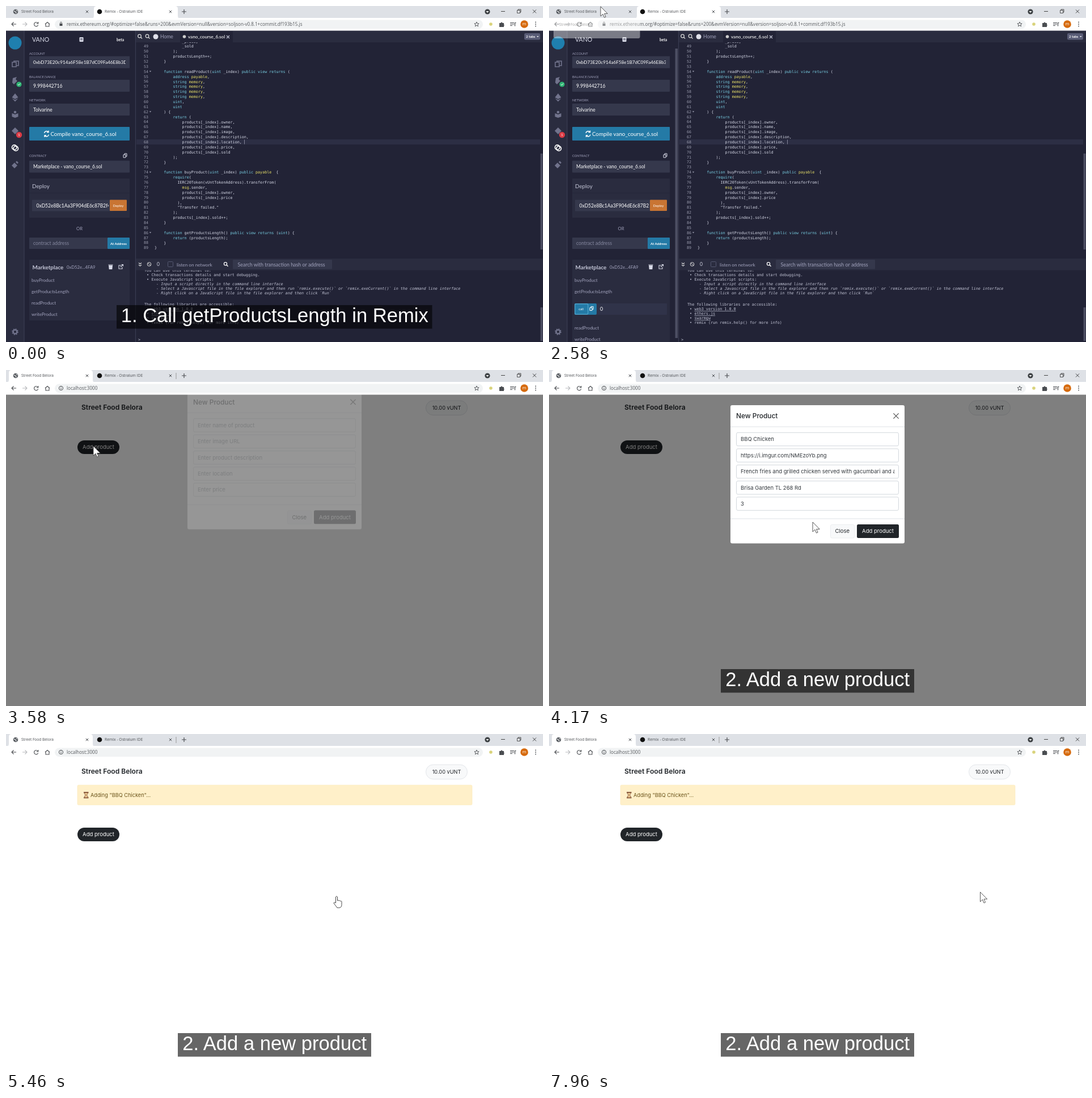
An HTML page that plays this animation: 947x592 px, repeating every 8000 ms.

```html
<!DOCTYPE html>
<html lang="en">
<head>
<meta charset="utf-8">
<title>Product walkthrough</title>
<style>
html, body { margin: 0; height: 100%; overflow: hidden; background: #fff; }
svg { display: block; width: 100vw; height: 100vh; }
text { white-space: pre; }
.ui { font-family: "Open Sans", "Noto Sans", sans-serif; }
.side { font-family: Lato, sans-serif; }
.mono { font-family: "DejaVu Sans Mono", monospace; }
.page { font-family: Inter, sans-serif; }
.wallet { font-family: Roboto, sans-serif; }
.cap { font-family: "Liberation Sans", Arial, sans-serif; }
</style>
</head>
<body>
<svg id="stage" viewBox="0 0 947 592" preserveAspectRatio="none"></svg>
<script>
const SHOP = 'Street Food Belora';
const CONTRACT = '0xD52e...4FA9';
const FILE = 'vano_course_6.sol';
const BLUE = '#247aa6', NAVY = '#222336', PANEL = '#2a2c3f', FIELD = '#35384c', SOFT = '#a2a3bd';

const esc = s => s.replace(/&/g, '&amp;').replace(/</g, '&lt;');
// y is the vertical middle of the line
const rawText = (x, y, body, size, fill, font, extra = '') =>
  `<text x="${x}" y="${(y + size * 0.36).toFixed(2)}" font-size="${size}" fill="${fill}" class="${font}" ${extra}>${body}</text>`;
const text = (x, y, s, ...rest) => rawText(x, y, esc(s), ...rest);
const rect = (x, y, w, h, fill, r = 0, extra = '') =>
  `<rect x="${x}" y="${y}" width="${w}" height="${h}" rx="${r}" fill="${fill}" ${extra}/>`;
const circle = (x, y, r, fill, extra = '') => `<circle cx="${x}" cy="${y}" r="${r}" fill="${fill}" ${extra}/>`;
const line = (d, stroke, w = 1, extra = '') =>
  `<path d="${d}" fill="none" stroke="${stroke}" stroke-width="${w}" ${extra}/>`;
const shape = (d, fill, extra = '') => `<path d="${d}" fill="${fill}" ${extra}/>`;
const cross = (x, y, r, color, w = 1) =>
  line(`M${x - r} ${y - r}l${2 * r} ${2 * r}m0 ${-2 * r}l${-2 * r} ${2 * r}`, color, w);
const group = (id, body, extra = '') => `<g id="${id}" ${extra}>${body}</g>`;
const clip = (id, x, y, w, h) => `<clipPath id="${id}">${rect(x, y, w, h, '#000')}</clipPath>`;
const middle = 'text-anchor="middle"', end = 'text-anchor="end"', bold = 'font-weight="700"', medium = 'font-weight="500"';
const copyIcon = (x, y, c) => line(`M${x - 3} ${y - 2}h4v5h-4zM${x - 1} ${y - 2}v-2h4v5h-2`, c, 1);
const globe = (x, y) => circle(x, y, 4.3, '#5f6368') + line(`M${x - 3} ${y - 1}l3 1 1 3m0-6l2 2`, '#fff', 1);

function browser(onShop) {
  const [tabX, url] = onShop
    ? [5, 'localhost:3000']
    : [155, 'remix.ethereum.org/#optimize=false&runs=200&evmVersion=null&version=soljson-v0.8.1+commit.df193b15.js'];
  const ink = '#4a4d51';
  return rect(0, 0, 947, 22, '#dee1e6') + rect(0, 21, 947, 22.5, '#fff') +
    shape(`M${tabX - 4} 22q4 0 4-5V5q0-5 5-5h138q5 0 5 5v12q0 5 4 5z`, '#fff') +
    globe(17, 10) + text(27, 10, SHOP, 6.6, '#4b4e52', 'ui') + cross(143, 10, 2.2, ink) +
    circle(165, 10, 4.3, '#111') + text(174, 10, 'Remix - Ostralum IDE', 6.8, '#4b4e52', 'ui') + cross(290, 10, 2.2, ink) +
    line('M310 10h8m-4-4v8', ink, 1.2) + (onShop ? line('M300 5v11', '#999') : '') +
    circle(849, 10, 4.6, '#3c4043') + shape('M846.5 9h5l-2.5 3z', '#fff') +
    line('M873 9.5h7', '#333', .9) + line('M901.5 7.5h5v5h-5zm1.5 0v-1.5h5v5h-1.5', '#333', .8) + cross(932, 9.5, 3, '#333', .9) +
    line('M18 32h-8m3.5-3.5l-3.5 3.5 3.5 3.5', ink, 1.1) +
    line('M29 32h8m-3.5-3.5l3.5 3.5-3.5 3.5', '#b8babd', 1.1) +
    line('M56 30a3.6 3.6 0 1 0 .6 3.5M56.8 28v3h-3', ink, 1.1) +
    line('M69 32l4-3.5 4 3.5m-7-1v5h6v-5', ink, 1.1) +
    rect(86, 24.5, 755, 15.5, '#f1f3f4', 7.7) +
    (onShop ? circle(97, 32, 3.6, 'none', `stroke="${ink}"`) + line('M97 31.5v2.5m0-4.5v1', ink, 1)
      : rect(94.5, 31, 5, 4, ink, .6) + line('M95.7 31v-1.5a1.3 1.3 0 0 1 2.6 0v1.5', ink, .9)) +
    text(107, 32, url, 8.05, '#55585c', 'ui') +
    shape('M830 28l1.1 2.8 3 .2-2.3 1.9.8 2.9-2.6-1.6-2.6 1.6.8-2.9-2.3-1.9 3-.2z', 'none', `stroke="${ink}" stroke-width=".9"`) +
    circle(855, 32, 2.8, '#d9d37c') +
    shape('M870 30h2.5a1.5 1.5 0 0 1 3 0h2.5v2.5a1.5 1.5 0 0 1 0 2.5v2h-8z', ink) +
    line('M889 29.5h7m-7 2.5h7m-7 2.5h4m4.5 1v-6h2', ink, 1.2) +
    circle(914, 32, 6.8, '#d66a0c') + text(914, 31.5, 'm', 7.5, '#fff', 'ui', middle) +
    [28.5, 32, 35.5].map(y => circle(934, y, .9, ink)).join('');
}

const code = `            _price,
            _sold
        );
        productsLength++;
    }

    function readProduct(uint _index) public view returns (
        address payable,
        string memory,
        string memory,
        string memory,
        string memory,
        uint,
        uint
    ) {
        return (
            products[_index].owner,
            products[_index].name,
            products[_index].image,
            products[_index].description,
            products[_index].location,
            products[_index].price,
            products[_index].sold
        );
    }

    function buyProduct(uint _index) public payable  {
        require(
          IERC20Token(vUntTokenAddress).transferFrom(
            msg.sender,
            products[_index].owner,
            products[_index].price
          ),
          "Transfer failed."
        );
        products[_index].sold++;
    }

    function getProductsLength() public view returns (uint) {
        return (productsLength);
    }
}`.split('\n');

const highlight = s => esc(s)
  .replace(/\b(function|returns?|uint|string|address|public|view|require)\b|\b(memory|payable|msg)\b/g,
    (word, cyan) => `<tspan fill="${cyan ? '#79cfe3' : '#ece36a'}">${word}</tspan>`);

function editor() {
  const rows = code.map((s, i) => {
    const n = 48 + i, y = 62.1 + i * 8.875, indent = s.search(/\S|$/);
    return text(251, y, String(n), 6.6, '#9a9cae', 'mono', end) +
      rawText(262 + indent * 4.05, y, highlight(s.trim()), 6.73, '#d5d8e6', 'mono') +
      ([54, 62, 74, 86].includes(n) ? shape(`M252.8 ${y - 1}h3.4l-1.7 2.2z`, '#9a9cae') : '');
  }).join('');
  return rect(229, 43, 718, 549, NAVY) + rect(230, 235, 712, 9, '#2c2e44') + rows +
    line('M420.5 235.5v8', '#9d9fb2', .8) + rect(229, 43.5, 718, 20.5, PANEL) +
    rect(307, 43.5, 93, 20.5, NAVY) +
    [236, 249.5].map(x => circle(x - .5, 53, 2.8, 'none', 'stroke="#ddd" stroke-width="1.2"') + line(`M${x + 1.5} 55l2.5 2.5`, '#ddd', 1.3)).join('') +
    circle(264, 54, 4.5, '#dfe0ea') + text(272, 54, 'Home', 8.6, SOFT, 'side') +
    circle(314.5, 54, 2.8, '#ccc') + text(321, 54, FILE, 8.1, '#fff', 'side', medium) + cross(391.5, 54.5, 2.5, '#b9bacb', 1.3) +
    rect(914, 48, 28, 11.5, '#595c76', 2) + text(917, 53.6, '2 tabs', 6, '#fff', 'side', bold) + shape('M936 53h3.5l-1.7 2z', '#fff') +
    rect(942.5, 260, 4, 169, '#4c4e62');
}

function terminal() {
  const row = (x, y, s, extra) => text(x, y, s, 6.75, '#c3c5d6', 'mono', extra);
  const item = (y, s, extra) => row(248, y, '•') + row(256.5, y, s, extra);
  const note = (y, s) => row(265, y, '- ' + s, 'font-style="italic"');
  const link = 'text-decoration="underline"';
  return rect(229, 431, 718, 161, NAVY) +
    row(244, 466, 'You can use this terminal to:') +
    item(474, 'Check transactions details and start debugging.') + item(482, 'Execute JavaScript scripts:') +
    note(490, 'Input a script directly in the command line interface') +
    note(498, 'Select a Javascript file in the file explorer and then run `remix.execute()` or `remix.exeCurrent()` in the command line interface') +
    note(505.7, 'Right click on a JavaScript file in the file explorer and then click `Run`') +
    row(244, 526, 'The following libraries are accessible:') +
    item(534, 'web3 version 1.0.0', link) + item(542, 'ethers.js', link) + item(550, 'swarmgw', link) +
    item(558, 'remix (run remix.help() for more info)') +
    row(233, 587.5, '>') +
    rect(229, 445, 718, 20.5, PANEL) + line('M234 452.5l2.5 2 2.5-2m-5 3.5l2.5 2 2.5-2', '#ddd', 1.1) +
    circle(252.5, 455, 3.3, 'none', 'stroke="#ddd"') + line('M250.2 452.7l4.6 4.6', '#ddd') +
    text(266, 455, '0', 8.5, '#d0d2e2', 'side') + rect(285.5, 450.5, 9, 9, 'none', 1, 'stroke="#555870"') +
    text(301, 456, 'listen on network', 8.2, SOFT, 'side') +
    circle(387, 454.3, 2.6, 'none', 'stroke="#fff" stroke-width="1.2"') + line('M389 456.3l2.5 2.5', '#fff', 1.4) +
    rect(400, 447, 175, 16.5, FIELD, 1) + text(408.5, 455.3, 'Search with transaction hash or address', 8.9, SOFT, 'side') +
    rect(942.5, 531, 4, 59, '#4c4e62');
}

function iconStrip() {
  const c = '#71738c';
  const ring = 'stroke="#fff" stroke-width="1.7"';
  return rect(0, 43, 32, 549, PANEL) + rect(32, 43, 196, 549, NAVY) + line('M32 43v549M228.5 43v549', '#3a3c52', 1.2) +
    circle(16, 65, 11.5, '#1f7fae') +
    line('M11 99h7v8h-7zM14 99v-2h8v8h-4', c, 1.6) +
    shape('M12 127l7-2-2 4 3 3-6 6-3-3z', c) + circle(23, 138, 4.6, '#2fb574') + line('M21 138l1.5 1.5 2.7-3', '#fff', 1) +
    shape('M16 154l5.5 7-5.5 3-5.5-3zM10.5 162.5l5.5 3 5.5-3-5.5 6z', c) +
    circle(16, 187, 2.3, c) + shape('M10.5 189l5.5 2 5.5-2v6l-5.5 2-5.5-2z', c) +
    shape('M16 214l6 6-6 6-6-6z', c) + circle(23, 227, 5.2, '#dc3c46') + text(23, 227, '1', 6.5, '#fff', 'side', middle) +
    circle(14.7, 249, 4.2, 'none', ring) + circle(17.3, 251, 4.2, 'none', ring) +
    shape('M10 281l5-5 5 5-5 5zM17 275l2-2 3 3-2 2z', c) +
    circle(16, 574, 3.4, 'none', `stroke="${c}" stroke-width="2.4"`) + circle(16, 574, 5, 'none', `stroke="${c}" stroke-width="1.5" stroke-dasharray="2 1.93"`);
}

// The panel gets narrower once its own scrollbar appears
function sidePanel(right, open) {
  const w = right - 41, mid = (41 + right) / 2, id = open ? 'open' : 'shut';
  const label = (y, s) => text(41, y, s, 5.7, SOFT, 'side');
  const field = (y, s) => rect(41, y - 10.5, w, 21, FIELD, 1) + text(48, y, s, 8.5, '#fff', 'side');
  const names = open ? [483, 503, 567, 587.5] : [483, 503, 523, 543.5];
  const call = !open ? '' : rect(45, 524, 163, 20, '#303349', 1) +
    rect(45, 524, 39, 20, BLUE, 2) + rect(45.7, 524.7, 23, 18.6, BLUE, 2, 'stroke="#4ba0c8" stroke-width="1.4"') +
    text(56.5, 534, 'call', 6, '#fff', 'side', middle) + copyIcon(75, 533.5, '#fff') +
    group('callResult', text(90, 534, '0', 8.8, '#fff', 'side'));
  return text(46, 59, 'VANO', 10.6, '#d9dbe8', 'side') + rect(129.5, 55, 7, 8, '#d9dbe8', 1) + line('M131 57.5h4m-4 2h4', NAVY, .8) +
    text(195, 59.3, 'beta', 6.6, '#fff', 'side', bold) +
    label(84, 'ACCOUNT') + clip('acct' + id, 41, 88, w - 6, 22) + `<g clip-path="url(#acct${id})">` +
    rect(41, 88.5, w, 21, FIELD, 1) + text(48, 99, '0xbD73E20c914a6F58e1B7dC09Fa46E8b3D5a', 8.2, '#fff', 'side') + '</g>' + rect(right - 7, 88.5, 7, 21, FIELD) +
    label(125, 'BALANCE (VANO)') + field(140.5, '9.998442716') + label(166, 'NETWORK') + field(182.5, 'Tolvarine') +
    rect(41, 213, w, 24, BLUE, 1) + text(mid + 7, 225.3, 'Compile ' + FILE, 9.8, '#fff', 'side', middle) +
    line(`M${mid - 62} 224a4 4 0 0 1 7-2m.5-2.5v3h-3m3.5 4a4 4 0 0 1-7 2m-.5 2.5v-3h3`, '#fff', 1.4) +
    label(264, 'CONTRACT') + copyIcon(right - 8, 264, '#d9dbe8') + field(283, 'Marketplace - ' + FILE) +
    rect(41, 304, w, 69, PANEL, 1) + text(46, 317, 'Deploy', 9.8, '#c3c5d6', 'side') +
    line(`M41 329.5h${w}`, '#24263a') + rect(46, 341.5, w - 35, 20, FIELD) + clip('dep' + id, 46, 340, w - 42, 22) +
    `<g clip-path="url(#dep${id})">` + text(53.5, 351.7, '0xD52e8Bc1Aa3F904dE6c87B2f4', 8.5, '#fff', 'side') + '</g>' +
    rect(right - 35, 341.5, 30, 19.5, '#c97533', 1) + text(right - 20, 352, 'Deploy', 5.9, '#fff', 'side', middle) +
    text(mid, 392, 'OR', 7.7, SOFT, 'side', middle) +
    rect(41, 408, w - 39, 20, FIELD, 1) + text(48, 418, 'contract address', 8.7, '#85879f', 'side') +
    rect(right - 39, 408, 39, 20, BLUE, 1) + text(right - 19.5, 418.5, 'At Address', 6, '#fff', 'side', middle + ' ' + bold) +
    rect(41, 447, w, open ? 145 : 107, PANEL, 1) + text(46.5, 460.3, 'Marketplace', 9.9, '#c3c5d6', 'side', bold) +
    text(107, 460.3, CONTRACT, 7.7, SOFT, 'side') +
    shape(`M${right - 37} 457h7l-.7 7h-5.6zM${right - 37.5} 455.5h8v1h-8z`, '#d9dbe8') +
    line(`M${right - 15} 457h-4v6h6v-3m-3 0l4.5-4.5m-3 0h3v3`, '#d9dbe8', 1.1) +
    ['buyProduct', 'getProductsLength', 'readProduct', 'writeProduct'].map((s, i) => text(45, names[i], s, 8, SOFT, 'side')).join('') +
    call + (open ? rect(222.5, 75, 4.5, 510, '#4c4e62') : '');
}

const button = (x, y, s, r) => rect(x, y - 12, 74, 24, '#212529', r) + text(x + 37, y, s, 9.5, '#fff', 'page', middle);

function shopPage() {
  return rect(0, 43, 947, 549, '#fff') + text(133, 66, SHOP, 12.1, '#212529', 'page', 'font-weight="600"') +
    rect(740.5, 54, 73, 25.5, '#f8f9fa', 12.7, 'stroke="#e3e6ea"') + text(777, 66.7, '10.00 vUNT', 9.2, '#212529', 'page', middle) +
    group('addButton', button(126, 136, 'Add product', 12)) +
    group('banner', rect(126, 90, 696, 35, '#fff0c9', 2, 'stroke="#fbe9bb" stroke-width=".6"') +
      shape('M138 103h6.5v1.5l-2.2 3 2.2 3.5v1.5h-6.5v-1.5l2.2-3.5-2.2-3z', '#e8c48c', 'stroke="#7b4a32" stroke-width=".9"') +
      line('M137 102.8h8.5m-8.5 9.7h8.5', '#7b4a32', 1.5) + text(149, 107.7, 'Adding "BBQ Chicken"…', 9.2, '#6a541a', 'page'));
}

function dialog() {
  const ys = [122, 150.5, 179, 207.3, 235.6];
  const filled = ['BBQ Chicken', 'https://i.imgur.com/NMEzoYb.png', 'French fries and grilled chicken served with gacumbari and avocado', 'Brisa Garden TL 268 Rd', '3'];
  const hints = ['Enter name of product', 'Enter image URL', 'Enter product description', 'Enter location', 'Enter price'];
  const column = (list, fill) => list.map((s, i) => text(338, ys[i], s, 9.5, fill, 'page')).join('');
  return rect(320, 62, 307, 243.5, '#fff', 3) + text(330, 81, 'New Product', 11.9, '#212529', 'page', medium) +
    cross(612, 81, 4.6, '#555', 1.3) + line('M320 100h307M320 262h307', '#dee2e6') +
    ys.map(y => rect(330.5, y - 11.7, 286, 23.4, '#fff', 2.5, 'stroke="#d3d8dd"')).join('') + clip('inputs', 330, 100, 279.5, 160) +
    `<g clip-path="url(#inputs)">${group('hints', column(hints, '#757c83'))}${group('values', column(filled, '#34393e'))}</g>` +
    rect(496.5, 272.5, 42, 23.5, '#f8f9fa', 2.5, 'stroke="#eceef0"') + text(517.3, 284, 'Close', 9.5, '#212529', 'page', middle) +
    button(543, 284, 'Add product', 2.5);
}

function walletWindow() {
  const t = (x, y, s, size, fill, extra) => text(x, y, s, size, fill, 'wallet', extra);
  const red = '#d8343f', grey = '#5e6469';
  const spin = (x, color) => rect(x, 203, 82, 14, '#fff', 1, `stroke="${color}"`) +
    line(`M${x + 76} 207.5l1.7-2 1.7 2m-3.4 4.5l1.7 2 1.7-2`, '#777', .8);
  const body = rect(735, 61, 204, 59, '#f4f5f7') + rect(735, 120, 204, 300, '#fff') +
    rect(749.5, 70.5, 97, 14.5, 'none', 1.5, 'stroke="#9ba0a5"') + t(798, 78, 'CONTRACT INTERACTION', 7.3, '#72777c', middle) +
    t(749, 103.5, '0', 20, '#3a3e42') + t(744, 129.5, 'DETAILS', 7.2, '#222', medium) + t(794, 129.5, 'DATA', 7.2, '#8a8f94') +
    line('M735 140.5h199', '#e3e5e7') + line('M739 140h39', '#2f7cc0', 1.6) +
    t(749, 166, 'GAS FEE', 7, grey, medium) + t(924, 160, '0', 15, '#3a3e42', end) + t(924, 175.7, 'No Conversion Rate Available', 9.5, '#6f757a', end) +
    t(749, 194.5, 'Gas Price (GWEI)', 6.2, '#444') + t(841, 194.5, 'Gas Limit', 6.2, '#444') + circle(829, 194, 3.1, '#b7babd') + circle(921, 194, 3.1, '#b7babd') +
    spin(749.5, '#c9ccd0') + spin(841.5, red) + t(754.5, 210, '0.5', 9.7, grey) + t(846.5, 210, '0', 9.7, grey) +
    t(841, 223, 'Gas limit must be at', 7.2, red) + t(841, 232.5, 'least 21000', 7.2, red) +
    line('M749 247.5h175', '#dcdfe2') + t(924, 260.5, 'AMOUNT + GAS FEE', 6.4, grey, end) + t(749, 278.5, 'TOTAL', 7, grey, medium) +
    t(924, 278, '0', 15, '#4a90d9', end) + t(924, 294, 'No Conversion Rate Available', 9.5, '#6f757a', end) +
    rect(744.5, 309, 184, 20.5, '#f8eae9', 1.5, `stroke="${red}"`) + circle(759.5, 319.3, 5, '#c8202c') + t(759.5, 319.3, '!', 8, '#fff', middle + ' ' + bold) +
    t(769, 319.7, 'ALERT: Gas limit must be at least 21000', 7.2, red) + line('M735 339.5h204', '#dcdfe2') +
    rect(744.5, 350.5, 86.5, 29, '#e9eaeb', 2, 'stroke="#777"') + t(788, 365, 'Reject', 9.5, '#4d5257', middle) +
    rect(842, 350, 86.5, 30, '#cfe0f3', 2) + t(885, 365, 'Confirm', 9.5, '#fff', middle);
  return rect(733, -8, 220, 384, '#000', 0, 'opacity=".18"') + rect(734, -6, 220, 380.5, '#fff', 0, 'stroke="#777"') + rect(735, 0, 212, 13, '#dee1e6') +
    circle(742, 4.5, 2.8, '#cfd98a') + text(749, 4.8, 'Vano Desktop Wallet Notification', 6.7, '#333', 'ui') +
    line('M875.5 5h7M903.5 2h5.5v5.5h-5.5z', '#333', .9) + cross(935, 4.8, 3, '#333', .9) +
    rect(836, 17, 111, 14.5, '#f1f2f4', 1) + circle(849, 24, 4.8, '#6a7075') + t(849, 24.2, '?', 7.5, '#fff', middle + ' ' + bold) +
    t(858.5, 24.5, 'Tolvarine Test Network', 7.4, '#333') +
    line('M735 35.5h212M735 60.5h212', '#e1e4e7') + circle(752, 47.5, 7.6, '#ee6220') + t(767, 47.5, 'Account 1', 9, '#333') +
    circle(841.5, 47.5, 8.8, '#fff', 'stroke="#ccd0d4"') + line('M837.5 47.5h8m-3.3-3.3l3.3 3.3-3.3 3.3', '#333', 1.2) +
    circle(868, 47.5, 7.6, '#16727a') + t(884, 47.5, '0xD52e...4F...', 9, '#333') +
    clip('walletBody', 735, 61, 204, 313) + `<g clip-path="url(#walletBody)">${group('walletScroll', body)}</g>` +
    rect(939, 61, 8, 313, '#f1f1f1') + group('walletThumb', rect(939.5, 71, 7.5, 279, '#b9bbbe')) +
    shape('M941 68l2.2-2.5 2.2 2.5zM941 367l2.2 2.5 2.2-2.5z', '#444');
}

const caption = (id, x, w, s) =>
  group(id, rect(x, 527, w, 41.5, '#000', 0, 'opacity=".6"') + text(473.7, 545, s, 34.6, '#fff', 'cap', middle));

document.getElementById('stage').innerHTML =
  group('remix', editor() + terminal() + iconStrip() + group('panelShut', sidePanel(218, false)) + group('panelOpen', sidePanel(213, true)) + browser(false) +
    group('hoverCard', rect(8, 22, 152.5, 35, '#fff', 3) + text(18, 33, SHOP, 6.6, '#222', 'ui'), 'opacity=".4"')) +
  group('shop', shopPage() + group('backdrop', rect(0, 43, 947, 549, '#000')) + group('dialog', dialog()) + browser(true)) +
  group('wallet', walletWindow()) +
  caption('caption1', 195, 556.5, '1. Call getProductsLength in Remix') + caption('caption2', 303, 341, '2. Add a new product') +
  group('cursor',
    group('arrow', shape('M0 0V17l4-3.8 2.5 6 2.6-1.1-2.5-5.7h5.6z', '#fff', 'stroke="#444" stroke-width=".9"')) +
    group('hand', shape('M-1.5 1.5Q0-1 1.5 1.5V8q1.5-1.5 2.6.3 1.8-1 2.6.6 2-.7 2.3 1.2v5q0 5-4 5.5H1Q-1 18-5 12.5q.5-2.5 3.5-.3z', '#fff', 'stroke="#333" stroke-width=".9"')));

const el = Object.fromEntries([...document.querySelectorAll('g[id]')].map(g => [g.id, g]));
const show = (id, on) => el[id].setAttribute('display', on ? 'inline' : 'none');
const move = (id, x, y) => el[id].setAttribute('transform', `translate(${x} ${y})`);
const fade = (id, a) => el[id].setAttribute('opacity', a);
const ramp = (t, a, b) => Math.min(1, Math.max(0, (t - a) / (b - a)));
const smooth = p => p * p * (3 - 2 * p);
const between = (t, a, b) => t >= a && t < b;

// time, x, y
const route = [
  [0, 330, 605], [60, 330, 605], [800, 78, 502], [900, 78, 502], [1250, 57, 533], [1640, 57, 533],
  [2380, 91, 1], [2640, 91, 1], [3200, 154, 134], [3640, 154, 134], [4070, 465, 268], [4250, 465, 268],
  [4790, 583, 285.5], [6840, 583, 285.5], [7450, 882, 345], [7680, 882, 345], [7930, 760.5, 278.5], [8000, 760.5, 278.5]];

function cursorAt(t) {
  const i = route.findIndex(p => p[0] > t), [t0, x0, y0] = route[i - 1], [t1, x1, y1] = route[i];
  const p = smooth((t - t0) / (t1 - t0));
  return [x0 + (x1 - x0) * p, y0 + (y1 - y0) * p];
}

function draw(t) {
  const onShop = t >= 2660, submitted = t >= 5170;
  show('remix', !onShop);
  show('shop', onShop);
  show('panelShut', t < 900);
  show('panelOpen', t >= 900);
  show('callResult', t >= 1320);
  show('hoverCard', between(t, 2500, 2660));

  const enter = ramp(t, 3565, 3655);
  fade('backdrop', 0.5 * ramp(t, 3490, 3560) * (1 - ramp(t, 5180, 5316)));
  show('dialog', !submitted);
  fade('dialog', enter);
  move('dialog', 0, -30 * (1 - enter));
  show('hints', t < 4090);
  show('values', t >= 4090);
  show('banner', submitted);
  move('addButton', 0, submitted ? 41 : 0);

  const scroll = 18 * smooth(ramp(t, 7000, 7250));
  show('wallet', between(t, 6040, 7690));
  move('walletScroll', 0, -scroll);
  move('walletThumb', 0, scroll * 0.8);

  show('caption1', t < 2000);
  show('caption2', t >= 4000);
  const hand = between(t, 720, 1700) || between(t, 3120, 3480) || between(t, 4700, 5600) || between(t, 7380, 7690);
  show('hand', hand);
  show('arrow', !hand);
  move('cursor', ...cursorAt(t));
}

function tick(now) {
  draw(now % 8000);
  requestAnimationFrame(tick);
}
draw(0);
requestAnimationFrame(tick);
</script>
</body>
</html>
```
